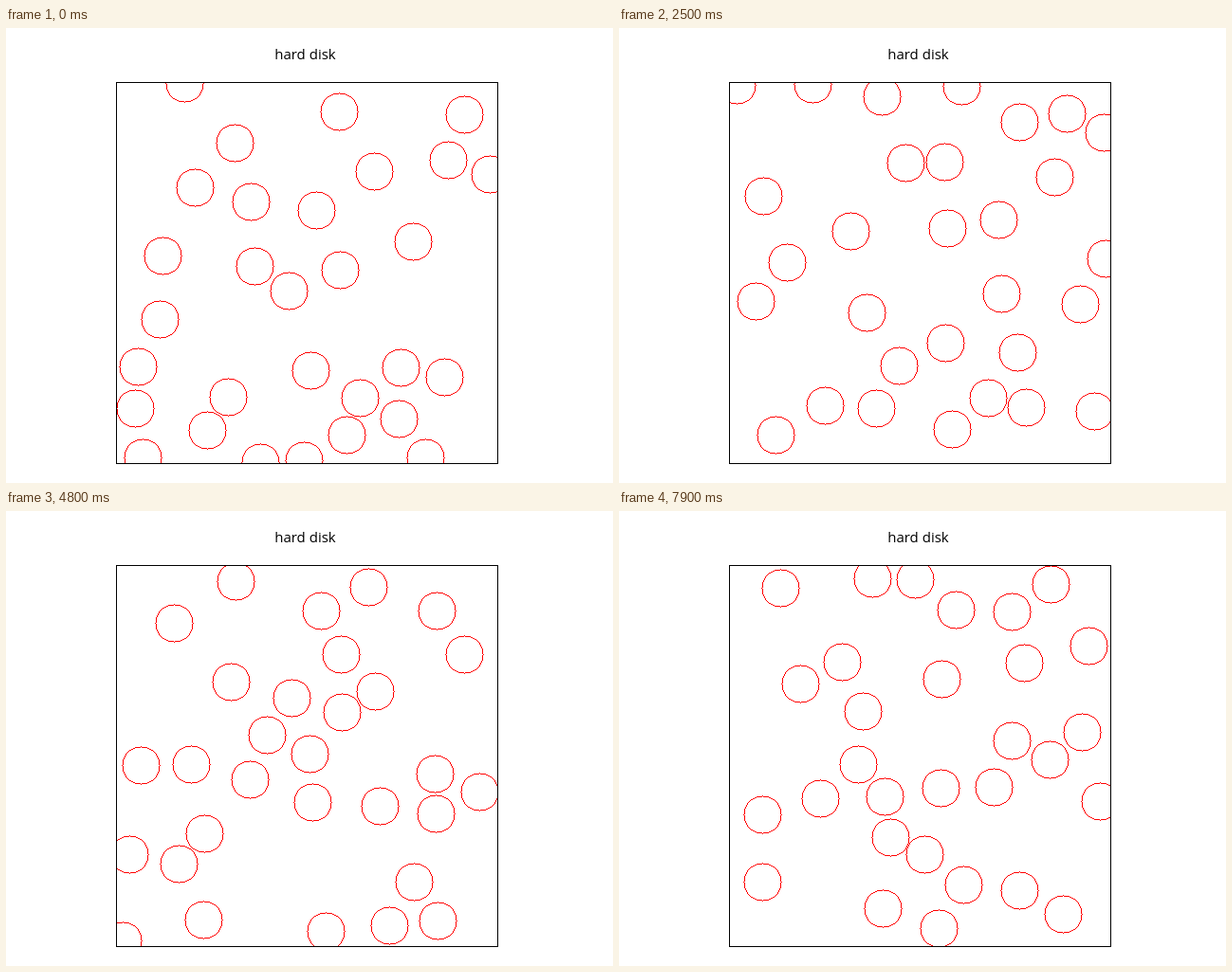
An HTML page with a canvas that plays this animation: 640x480 px, repeating every 8 s.

```html
<!DOCTYPE html>
<html lang="en">
<head>
<meta charset="utf-8">
<title>hard disk</title>
<style>
  html, body { margin: 0; width: 100%; height: 100%; overflow: hidden; background: #fff; }
  canvas { position: absolute; left: 0; top: 0; }
  div {
    position: absolute; left: 0; top: 17px; width: 631px;
    font: 15px/20px "Open Sans", sans-serif; text-align: center; color: #000;
  }
</style>
</head>
<body>
<canvas width="640" height="480"></canvas>
<div>hard disk</div>
<script>
const LEFT = 116, TOP = 57, SIDE = 402, RADIUS = 20, COUNT = 30;
const STEP = 100, FRAMES = 80, SUBSTEPS = 50;

let seed = 7;
function random() {
  seed = (Math.imul(seed, 1664525) + 1013904223) >>> 0;
  return seed / 2 ** 32;
}

// Shortest signed distance and position in the periodic box.
const nearest = d => d - SIDE * Math.round(d / SIDE);
const wrap = p => (p % SIDE + SIDE) % SIDE;

// Scatter disks without overlap, each with a random heading and speed.
const disks = [];
while (disks.length < COUNT) {
  const x = random() * SIDE, y = random() * SIDE;
  if (disks.some(d => Math.hypot(nearest(d.x - x), nearest(d.y - y)) < 2 * RADIUS)) continue;
  const angle = random() * 2 * Math.PI, speed = 0.02 + random() * 0.04;
  disks.push({ x, y, vx: speed * Math.cos(angle), vy: speed * Math.sin(angle) });
}

// Elastic collision of equal masses: swap velocity along the line of centres.
function collide(a, b) {
  const dx = nearest(b.x - a.x), dy = nearest(b.y - a.y);
  const dist2 = dx * dx + dy * dy;
  if (dist2 > 4 * RADIUS * RADIUS) return;
  const push = ((b.vx - a.vx) * dx + (b.vy - a.vy) * dy) / dist2;
  if (push >= 0) return;
  a.vx += push * dx; a.vy += push * dy;
  b.vx -= push * dx; b.vy -= push * dy;
}

function advance(dt) {
  for (const d of disks) {
    d.x = wrap(d.x + d.vx * dt);
    d.y = wrap(d.y + d.vy * dt);
  }
  disks.forEach((a, i) => {
    for (let j = i + 1; j < COUNT; j++) collide(a, disks[j]);
  });
}

const frames = [];
for (let i = 0; i < FRAMES; i++) {
  frames.push(disks.map(d => [Math.round(LEFT + d.x), Math.round(TOP + d.y)]));
  for (let k = 0; k < SUBSTEPS; k++) advance(STEP / SUBSTEPS);
}

const ctx = document.querySelector("canvas").getContext("2d");

// One-pixel outline without antialiasing; rounding down leaves a tip on each side.
function circle(cx, cy) {
  for (let u = -14; u <= 14; u++) {
    const v = Math.floor(Math.sqrt(RADIUS * RADIUS - u * u));
    for (const w of [v, -v]) {
      ctx.fillRect(cx + u, cy + w, 1, 1);
      ctx.fillRect(cx + w, cy + u, 1, 1);
    }
  }
}

function draw(positions) {
  ctx.clearRect(0, 0, 640, 480);
  ctx.save();
  ctx.beginPath();
  ctx.rect(LEFT, TOP, SIDE + 1, SIDE + 1);
  ctx.clip();
  ctx.fillStyle = "#f00";
  for (const [x, y] of positions) circle(x, y);
  ctx.restore();
  ctx.strokeStyle = "#000";
  ctx.strokeRect(LEFT + 0.5, TOP + 0.5, SIDE, SIDE);
}

let shown = -1;
function tick() {
  const index = Math.floor(performance.now() / STEP) % FRAMES;
  if (index !== shown) draw(frames[shown = index]);
  requestAnimationFrame(tick);
}
tick();
</script>
</body>
</html>
```
